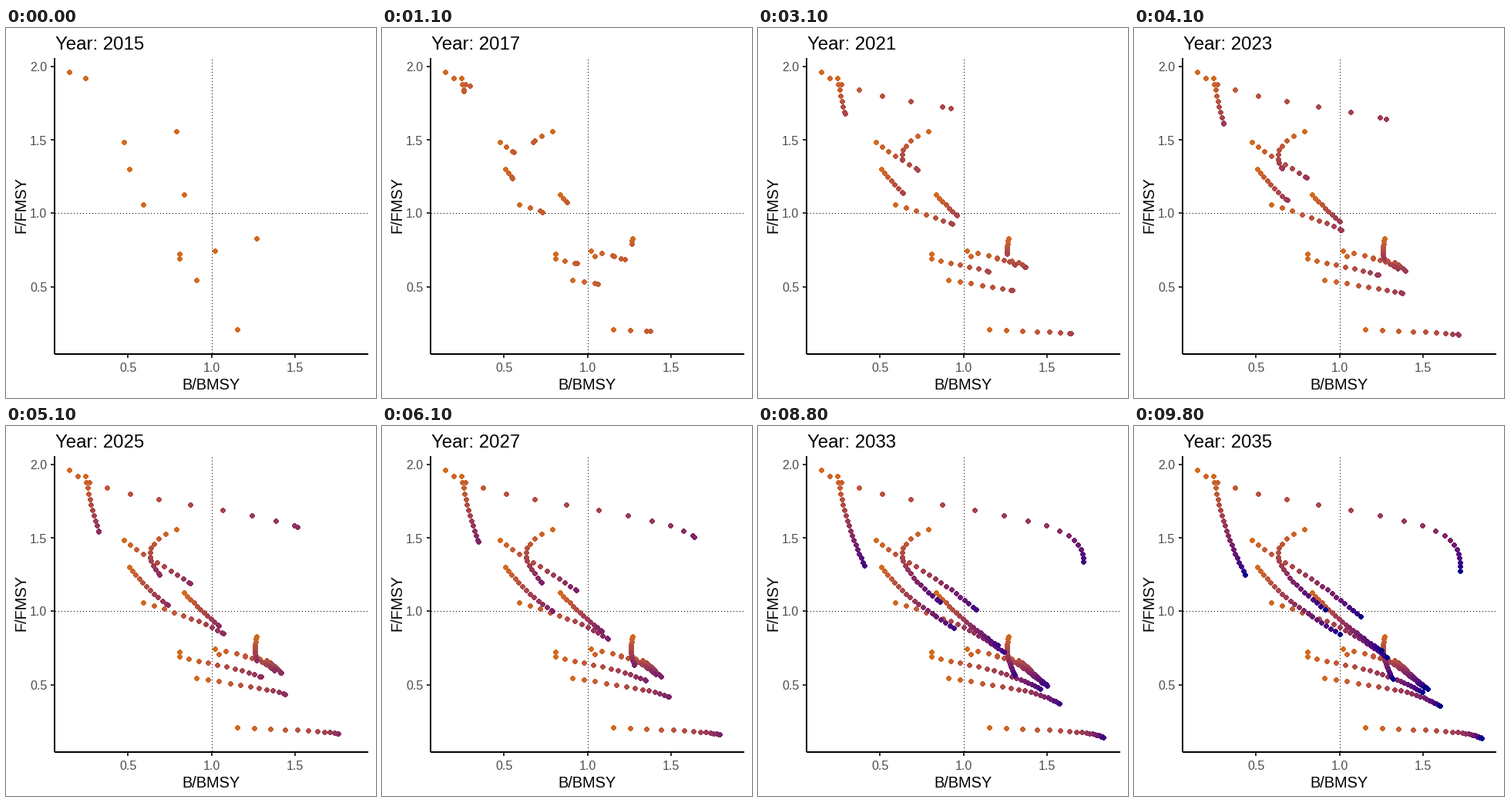
A matplotlib script that plays this animation: 480 by 480 pixels, repeating every 10000 ms.

```python
import numpy as np
import matplotlib.pyplot as plt
from matplotlib.animation import FuncAnimation

SIZE, DPI = 480, 100
PX = 72 / DPI
FRAMES, FIRST, SPAN = 100, 2015, 20
YEARS = np.arange(SPAN + 1)
ZERO_Y = 431.3      # pixel row where F/FMSY is zero
DECLINE = 0.651     # share of fishing pressure left at the end


def stock(row, start, end, drift, rate, delay=0):
    """Yearly positions: a steady drift, reached after a logistic catch-up."""
    gap = (1 + np.exp(-rate * delay)) / (1 + np.exp(rate * (YEARS - delay)))
    trend = end - drift * (SPAN - YEARS)
    x = trend + (start - trend[0]) * gap
    y = ZERO_Y - (ZERO_Y - row) * DECLINE ** (YEARS / SPAN)
    return np.column_stack([x, y])


STOCKS = [
    stock(57, 82, 424, 0, 0.47, delay=6.1),
    stock(65, 103, 143.7, 2.7, 0.2),
    stock(148, 153, 294.5, 5, 0.33, delay=4.5),
    stock(183, 160, 267, 6, 0.3),
    stock(229, 178, 329, 4, 0.275),
    stock(134, 221, 247.5, 5.6, 0.27, delay=-10),
    stock(216, 231, 321, 4.65, 0.3),
    stock(293, 225, 381, 2.45, 0.98),
    stock(299, 225, 374.5, 3.4, 0.29, delay=2),
    stock(327, 247, 398.5, 2.2, 0.265, delay=1),
    stock(289, 271, 377, 2.85, 0.48),
    stock(273, 325, 335.5, 1.25, 0.26),
    stock(391, 300, 451.3, 1.2, 0.33),
]
TRACKS = np.stack(STOCKS, axis=1)       # year, stock, xy

RGB_XYZ = np.array([[0.4124, 0.3576, 0.1805],
                    [0.2126, 0.7152, 0.0722],
                    [0.0193, 0.1192, 0.9505]])
WHITE = RGB_XYZ.sum(axis=1)
XYZ_LAB = np.array([[0, 116, 0], [500, -500, 0], [0, 200, -200]])


def to_lab(rgb):
    c = np.array(rgb) / 255
    linear = np.where(c > 0.04045, ((c + 0.055) / 1.055) ** 2.4, c / 12.92)
    t = RGB_XYZ @ linear / WHITE
    f = np.where(t > 0.008856, np.cbrt(t), 7.787 * t + 16 / 116)
    return XYZ_LAB @ f - [16, 0, 0]


def to_rgb(lab):
    f = np.linalg.solve(XYZ_LAB, lab + [16, 0, 0])
    t = np.where(f > 0.2069, f ** 3, (f - 16 / 116) / 7.787)
    c = np.clip(np.linalg.solve(RGB_XYZ, t * WHITE), 0, 1)
    return np.clip(np.where(c > 0.0031308, 1.055 * c ** (1 / 2.4) - 0.055, 12.92 * c), 0, 1)


LOW, HIGH = to_lab((210, 105, 30)), to_lab((0, 0, 139))


def year_color(t):
    return to_rgb(LOW + (HIGH - LOW) * t / SPAN)


YEAR_COLORS = np.array([year_color(y) for y in YEARS])


def pixel_disc():
    """Outline of a seven pixel wide disc with stepped corners."""
    corner = np.array([(1.5, 3.5), (1.5, 2.5), (2.5, 2.5), (2.5, 1.5), (3.5, 1.5)])
    quarter_turn = np.array([[0, -1], [1, 0]])
    corners = [corner @ np.linalg.matrix_power(quarter_turn, n) for n in range(4)]
    return np.vstack(corners + [corner[:1]])


fig = plt.figure(figsize=(SIZE / DPI, SIZE / DPI), dpi=DPI, facecolor="white")
ax = fig.add_axes([0, 0, 1, 1])
ax.set(xlim=(0, SIZE), ylim=(SIZE, 0))
ax.axis("off")


def line(x0, y0, x1, y1, color="black", width=2, **style):
    ax.plot([x0, x1], [y0, y1], color=color, lw=width * PX, snap=False,
            solid_capstyle="butt", dash_capstyle="butt", **style)


def label(x, y, text, size, color="black", **style):
    return ax.text(x, y, text, fontsize=size * PX, color=color,
                   family="Liberation Sans", **style)


dots = dict(width=1, linestyle=(0, (1, 3)), zorder=1)
line(267.5, 422, 267.5, 40, **dots)
line(64, 240.5, 470, 240.5, **dots)
line(63, 39, 63, 423)
line(63, 423, 470, 423)

for x, text in zip((158, 267, 375), ("0.5", "1.0", "1.5")):
    line(x, 424, x, 428, "#333333")
    label(x, 446, text, 16, "#4D4D4D", ha="center")
for y, text in zip((50, 145, 240, 336), ("2.0", "1.5", "1.0", "0.5")):
    line(58, y, 62, y, "#333333")
    label(53.5, y + 6.5, text, 16, "#4D4D4D", ha="right")

label(266, 469, "B/BMSY", 20, ha="center")
label(19.5, 230, "F/FMSY", 20, ha="center", va="center", rotation=90)
title = label(63.6, 28, "", 24)
points = ax.scatter([], [], s=(7 * PX) ** 2, marker=pixel_disc(),
                    linewidths=0, snap=False, zorder=3)


def update(frame):
    year, step = divmod(frame, 5)
    steps = 3 if year == SPAN - 1 else 4
    part = min(step / steps, 1)
    now = TRACKS[year] * (1 - part) + TRACKS[year + 1] * part
    spots = np.concatenate([TRACKS[:year + 1], now[None]])
    colors = np.vstack([YEAR_COLORS[:year + 1], year_color(year + part)])
    points.set_offsets(np.round(spots.reshape(-1, 2)) + 0.5)
    points.set_facecolor(np.repeat(colors, len(STOCKS), axis=0))
    title.set_text(f"Year: {FIRST + round(SPAN * frame / (FRAMES - 1))}")
    return points, title


anim = FuncAnimation(fig, update, frames=FRAMES, interval=100,
                     repeat=True, repeat_delay=0)
plt.show()
```
